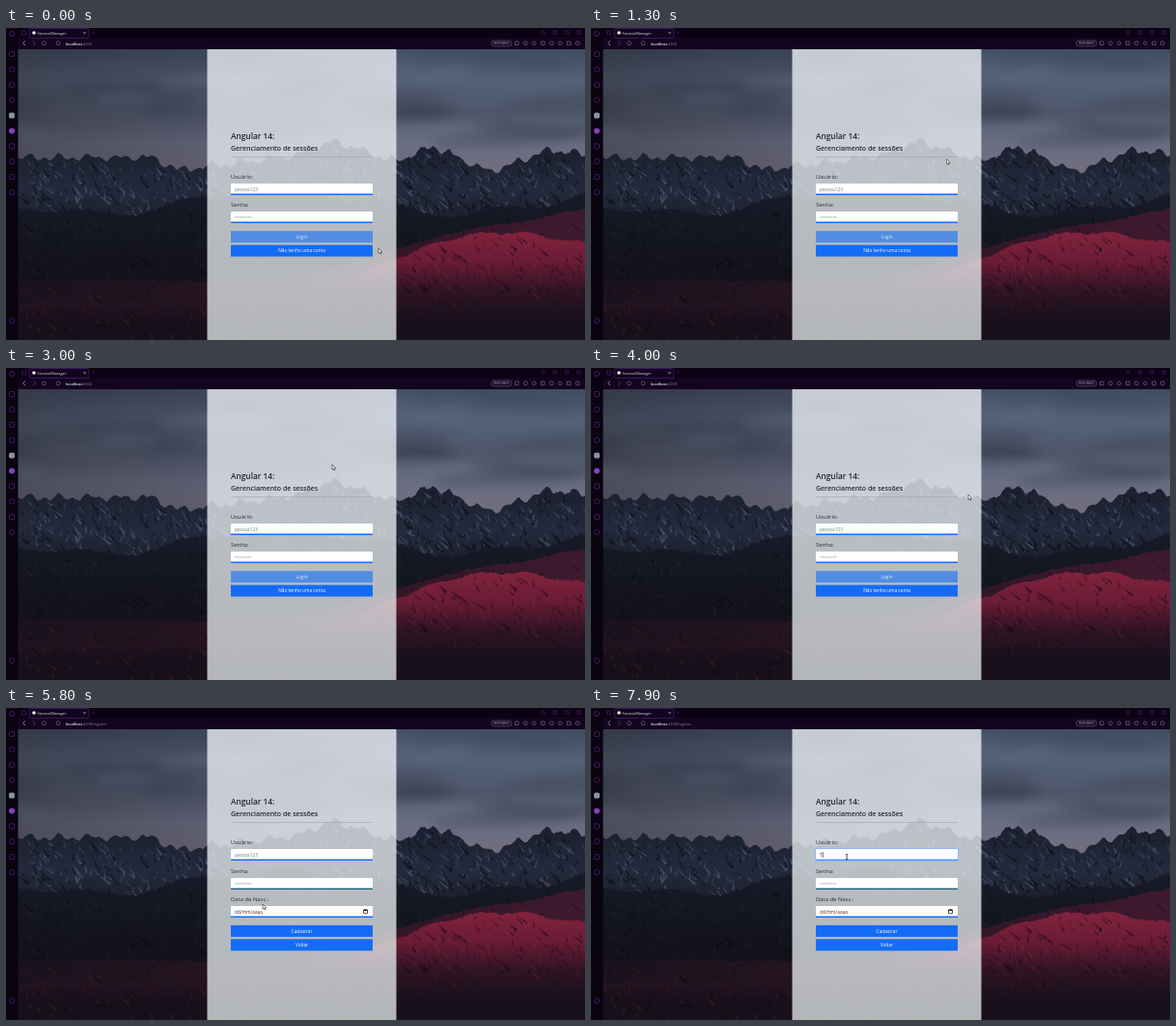
Animation, 600 px wide and 323 px high, one loop 8 s. Source, as an HTML page with a canvas:

```html
<!DOCTYPE html>
<html lang="pt-BR">
<head>
<meta charset="utf-8">
<title>SessionManager</title>
<style>
html, body { margin: 0; width: 100%; height: 100%; overflow: hidden; background: #0a0310; }
canvas { display: block; }
</style>
</head>
<body>
<canvas id="stage" width="600" height="323"></canvas>
<script>
const W = 600, H = 323, LOOP = 8000;
const LEFT = 233, FORM_W = 147, ROW_H = 12, LINE_GAP = 14.7;
const REGISTER_AT = 5500, FOCUS_AT = 7000, BLINK = 500, TYPE_AT = 7700;
const BLUE = '#146cf6', HOVER = '#0b5ed7', DISABLED = '#528de2';
const stage = document.getElementById('stage').getContext('2d');
const backdrop = document.createElement('canvas');
backdrop.width = W;
backdrop.height = H;
let g = backdrop.getContext('2d');

let seed = 7;
const rnd = (a = 0, b = 1) => {
  seed = (seed * 16807) % 2147483647;
  return a + (b - a) * seed / 2147483647;
};
const ramp = (x, a, b) => {
  const u = Math.min(1, Math.max(0, (x - a) / (b - a)));
  return u * u * (3 - 2 * u);
};

// Linear interpolation through rows of [key, ...values]
function along(rows, k) {
  const i = Math.max(1, rows.findIndex(row => row[0] >= k));
  const [a, b] = [rows[i - 1], rows[i]];
  const u = (k - a[0]) / (b[0] - a[0]);
  return a.slice(1).map((v, j) => v + (b[j + 1] - v) * u);
}

function rect(x, y, w, h, color) {
  g.fillStyle = color;
  g.fillRect(x, y, w, h);
}
function paint(fill, stroke, width = 0.7) {
  if (fill) { g.fillStyle = fill; g.fill(); }
  if (stroke) { g.strokeStyle = stroke; g.lineWidth = width; g.stroke(); }
}
function path(points, ...style) {
  g.beginPath();
  points.forEach(([x, y]) => g.lineTo(x, y));
  paint(...style);
}
function round(x, y, w, h, r, ...style) {
  g.beginPath();
  g.roundRect(x, y, w, h, r);
  paint(...style);
}
function text(s, x, y, size, color, weight = 400, align = 'left') {
  g.font = `${weight} ${size}px "Open Sans", "Noto Sans", sans-serif`;
  g.textAlign = align;
  g.fillStyle = color;
  g.fillText(s, x, y);
}
function gradient(x0, y0, x1, y1, ...colors) {
  const grad = g.createLinearGradient(x0, y0, x1, y1);
  colors.forEach((c, i) => grad.addColorStop(i / (colors.length - 1), c));
  return grad;
}

// Land mass below a crest line, with small streaks down its slopes
function land(crest, rough, fill, count, depth, colors) {
  const outline = [[W, H], [12, H]];
  for (let x = 12; x <= W; x += 2) outline.push([x, crest(x) + rnd(-rough, rough)]);
  g.save();
  path(outline, fill);
  g.clip();
  for (let i = 0; i < count; i++) {
    const x = rnd(12, W), y = crest(x) + depth * rnd();
    const len = rnd(3, 12), lean = rnd(-0.8, 1.2) * len;
    path([[x, y], [x + lean, y + len], [x + lean + rnd(0.5, 3), y + len * 0.8]], colors[i % colors.length]);
  }
  g.restore();
}

function drawPhoto() {
  rect(12, 22, W, H, gradient(0, 22, 0, 150, '#404c62', '#566178', '#4e576b', '#6a6f84', '#726d7e'));
  rect(12, 22, W, H, gradient(12, 0, 420, 0, 'rgba(32,30,36,.42)', 'rgba(40,40,48,0)'));
  g.save();
  g.filter = 'blur(6px)';
  for (let i = 0; i < 30; i++) {
    g.beginPath();
    g.ellipse(rnd(0, W), rnd(25, 115), rnd(30, 80), rnd(3, 8), rnd(-0.15, 0.1), 0, 7);
    paint(i % 2 ? 'rgba(38,44,58,.3)' : 'rgba(128,136,154,.18)');
  }
  g.restore();

  const peaks = [[0, 134], [150, 134], [180, 147], [300, 132], [340, 117], [404, 138],
    [443, 122], [500, 149], [565, 126], [W, 131]];
  const alps = x => along(peaks, x)[0] + 2.5 * Math.sin(x / 5) + 2 * Math.sin(x / 2.3);
  land(alps, 1, gradient(0, 120, 0, 215, '#1a1f2e', '#232a3b', '#171a27'), 1100, 65,
    ['rgba(104,114,138,.42)', 'rgba(10,13,23,.6)', 'rgba(72,80,102,.4)', 'rgba(10,13,23,.45)']);
  const foothills = x => 180 + 12 * Math.sin(x / 60) + 4 * Math.sin(x / 17);
  land(foothills, 1.5, gradient(0, 175, 0, 300, '#171a27', '#12131d', '#17121c'), 500, 90,
    ['rgba(66,74,95,.14)', 'rgba(6,7,14,.35)']);
  const farRidge = x => 262 - 60 * ramp(x, 250, 540) - 14 * ramp(x, 520, W);
  land(farRidge, 1, gradient(12, 0, W, 0, '#1a121d', '#291522', '#3f1a2f'), 350, 70,
    ['rgba(100,28,52,.28)', 'rgba(14,9,18,.4)']);
  const redHill = x => 285 - 73 * ramp(x, 250, 510) + 10 * ramp(x, 530, W) + 1.5 * Math.sin(x / 8);
  land(redHill, 1, gradient(0, 210, 0, 302, '#83233f', '#6b1c35', '#301424', '#17101b'), 600, 65,
    ['rgba(22,9,20,.5)', 'rgba(158,46,72,.2)', 'rgba(26,10,22,.4)']);
  rect(208.5, 22, 196, H, gradient(0, 22, 0, H, 'rgba(236,239,246,.79)', 'rgba(234,240,240,.74)'));
}

function drawBrowser() {
  const purple = '#511a78', icon = '#76608a';
  rect(0, 0, W, 22, '#13051e');
  rect(0, 0, W, 10, '#0b0213');
  rect(0, 0, 12.5, H, '#0a0310');
  round(24, 0.5, 62, 10, 2, '#13051e', purple);
  round(27.2, 3.2, 3.6, 3.6, 1.8, '#eee');
  text('SessionManager', 32.5, 6.7, 3.9, '#e5dfea');
  text('×', 81.5, 7, 6, '#c9bdd2', 400, 'center');
  text('+', 90.5, 7, 6, purple, 400, 'center');
  round(16.5, 3, 4, 4, 0.5, null, purple);

  path([[20, 13.5], [17.5, 15.8], [20, 18]], null, '#b7a4c5');
  path([[28, 13.5], [30.5, 15.8], [28, 18]], null, '#60456e');
  round(37.5, 13.8, 4, 4, 2, null, icon);
  round(52, 13.8, 4, 4, 2, null, icon);
  round(503, 13, 21, 5.8, 3, null, icon, 0.6);
  text('RESPONSIVO', 513.5, 17, 2.6, '#a48fb5', 600, 'center');
  for (let i = 0; i < 8; i++) round(527.5 + 9 * i, 14, 3.6, 3.6, i % 3, null, icon);
  for (let i = 0; i < 4; i++) round(555 + 12.3 * i, 3, 3.2, 3.2, i ? 0 : 1.6, null, purple);

  for (let i = 0; i < 10; i++) {
    const filled = ['#8b93a6', '#8442c4'][i - 4];
    round(3.5, 24.5 + 15.9 * i, 5, 5, 1 + i % 2, filled, filled || purple, 0.9);
  }
  for (const y of [3.5, 300.5]) round(3.5, y, 5, 5, 2.5, null, purple, 0.9);
  text('···', 6, 318, 6, purple, 400, 'center');
}

const LOGIN = {
  top: 0, url: '', fields: ['Usuário:', 'Senha:'], buttons: ['Login', 'Não tenho uma conta']
};
const REGISTER = {
  top: -LINE_GAP, url: '/register', fields: ['Usuário:', 'Senha:', 'Data de Nasc.:'], buttons: ['Cadastrar', 'Voltar']
};
const HINTS = ['pessoa123', '********', 'dd/mm/aaaa'];
const CURSOR = [[0, 386, 228], [700, 414, 189], [1700, 338, 100], [3600, 338, 100], [4000, 391, 131],
  [4600, 300, 227], [5100, 266, 230], [REGISTER_AT, 266, 230], [6300, 266, 158], [LOOP, 265, 154]];

function drawField(label, i, top, isRegister, t) {
  const focused = isRegister && i === 0 && t >= FOCUS_AT;
  const typed = focused && t >= TYPE_AT;
  const line = focused ? '#5b9bff' : isRegister && i === 1 ? '#27647e' : BLUE;
  text(label, LEFT, top - 4.8, 5.9, '#292d35');
  if (focused) round(LEFT - 1, top - 1, FORM_W + 2, ROW_H + 2, 1.5, '#8eb6f5');
  rect(LEFT, top, FORM_W, ROW_H, '#fff');
  rect(LEFT, top + ROW_H - 1.5, FORM_W, 1.5, line);
  if (typed) text('T', 237, top + 7.8, 4.8, '#212529');
  else text(HINTS[i], 237, top + 7.8, i === 1 ? 4 : 4.8, i === 2 ? '#343940' : '#77778b');
  if (typed || focused && t < FOCUS_AT + BLINK) rect(typed ? 239.9 : 236.8, top + 3, 0.6, 6, '#222');
  if (i === 2) {
    round(370.5, top + 3.8, 4, 4, 0.4, null, '#222', 0.8);
    rect(370.5, top + 3.8, 4, 1.3, '#222');
  }
}

// Draws the page and returns the cursor shape for the point (x, y)
function drawPage(page, t, x, y) {
  const isRegister = page === REGISTER;
  const over = top => x >= LEFT && x <= LEFT + FORM_W && y >= top && y <= top + ROW_H;
  let shape = 'arrow';
  text('localhost', 62, 17.5, 3.9, '#eee8f2', 600);
  text(':4200' + page.url, 62 + g.measureText('localhost').width, 17.5, 3.9, '#8d7a99');
  text('Angular 14:', LEFT, 115 + page.top, 8.3, '#212733', 600);
  text('Gerenciamento de sessões', LEFT, 127 + page.top, 7, '#212733', 600);
  rect(LEFT, 133 + page.top, FORM_W, 0.6, '#a1a4ac');

  page.fields.forEach((label, i) => {
    const top = Math.round(161 + page.top + 2 * LINE_GAP * i);
    drawField(label, i, top, isRegister, t);
    if (over(top)) shape = 'beam';
  });
  page.buttons.forEach((label, i) => {
    const top = 210.2 - page.top + 14.4 * i;
    const disabled = !isRegister && i === 0;
    const hot = !disabled && over(top);
    if (hot) shape = 'hand';
    rect(LEFT, top, FORM_W, ROW_H, disabled ? DISABLED : hot ? HOVER : BLUE);
    text(label, LEFT + FORM_W / 2, top + 7.8, 4.8, disabled ? '#e0e9f8' : '#fff', 400, 'center');
  });
  return shape;
}

function drawCursor(shape, x, y) {
  g.save();
  g.translate(x, y);
  if (shape === 'arrow') {
    path([[0, 0], [0, 5.2], [1.2, 4.2], [2, 6], [2.9, 5.6], [2.1, 3.9], [3.7, 3.8], [0, 0]], '#fff', '#24242a', 0.6);
  } else if (shape === 'hand') {
    round(-1.8, 2.8, 4.6, 4, 1.2, '#fff', '#222', 0.5);
    round(-0.6, 0, 1.3, 4.5, 0.6, '#fff');
  } else {
    rect(-0.4, -3, 0.8, 6, '#222');
    for (const end of [-3, 2.4]) rect(-1.3, end, 2.6, 0.6, '#222');
  }
  g.restore();
}

function frame(now) {
  const t = Math.floor((now % LOOP) / 100) * 100;
  const [x, y] = along(CURSOR, t);
  g.drawImage(backdrop, 0, 0);
  drawCursor(drawPage(t < REGISTER_AT ? LOGIN : REGISTER, t, x, y), x, y);
  requestAnimationFrame(frame);
}

drawPhoto();
drawBrowser();
g = stage;
requestAnimationFrame(frame);
</script>
</body>
</html>
```
